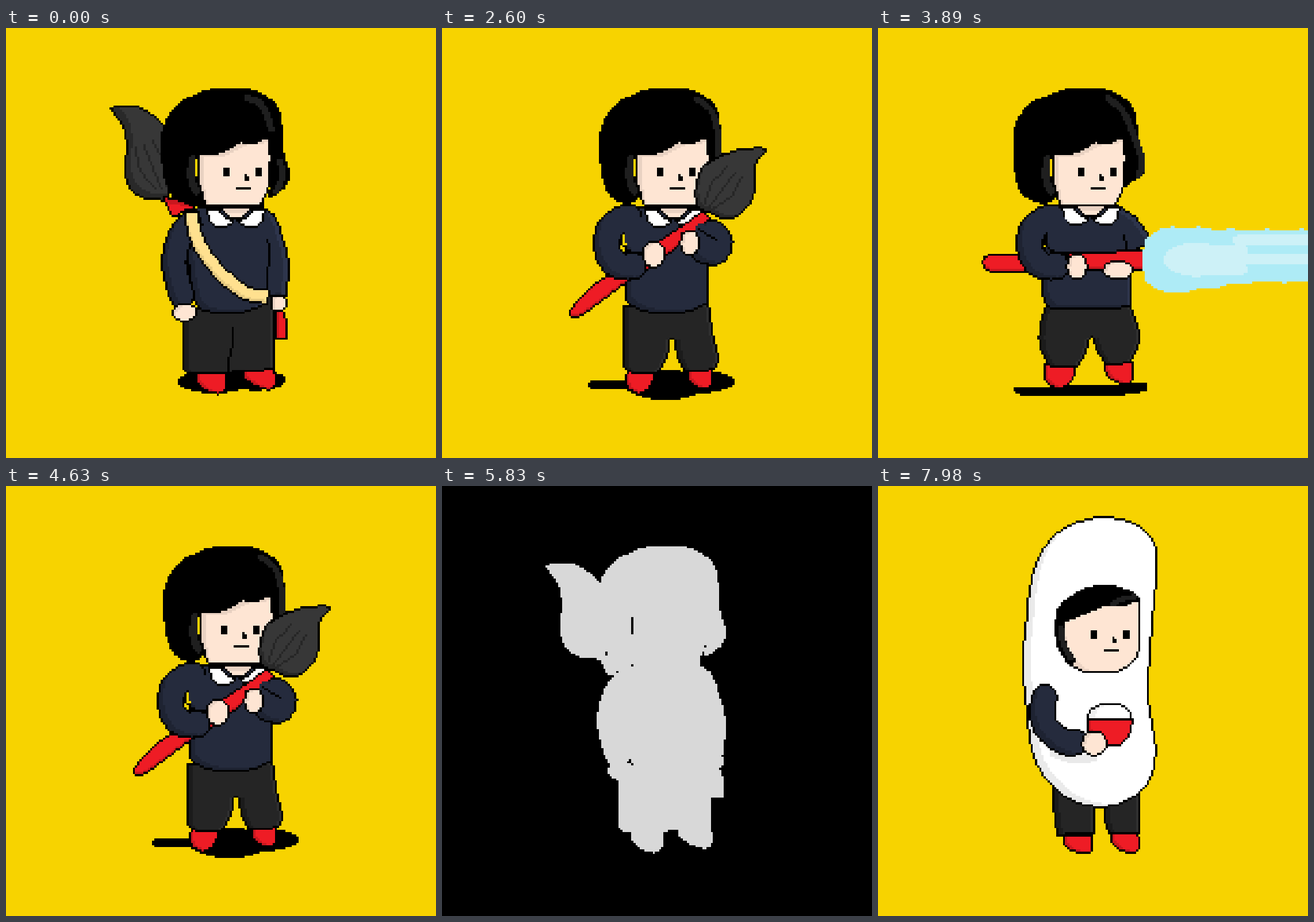
Write an HTML page with a canvas that moves like this. It is 748x748 px and loops after 8 s.

```html
<!DOCTYPE html>
<html lang="en">
<head>
<meta charset="utf-8">
<title>Brush hero</title>
<style>
  html, body { margin: 0; width: 100%; height: 100%; overflow: hidden; background: #f7d300; }
  canvas { display: block; width: 100vw; height: 100vh; image-rendering: pixelated; }
</style>
</head>
<body>
<canvas id="stage" width="748" height="748"></canvas>
<script>
// All drawing happens on a grid of N x N hard pixels.
const N = 200;
const C = {
  bg: '#f7d300', ink: '#000000', skin: '#fee5d3', navy: '#252b3d', pants: '#252525', hair: '#1f1f1f',
  brush: '#373737', bristle: '#262626', red: '#ee1c25', strap: '#ffe08f', white: '#ffffff',
  water: '#aeebf6', foam: '#cdf1f7', ghost: '#d8d8d8'
};

const newCanvas = () => Object.assign(document.createElement('canvas'), { width: N, height: N });
const stage = document.getElementById('stage').getContext('2d');
stage.imageSmoothingEnabled = false;
const pen = newCanvas().getContext('2d', { willReadFrequently: true });
pen.lineCap = pen.lineJoin = 'round';

let px, ox = 0, oy = 0;

function shift(dx, dy, draw) {
  ox += dx; oy += dy;
  draw();
  ox -= dx; oy -= dy;
}

// Packed pixel value, optionally darkened or lightened.
function ink(hex, tone = 1) {
  const [r, g, b] = [1, 3, 5].map(i => Math.min(255, parseInt(hex.substr(i, 2), 16) * tone));
  return (0xff000000 | b << 16 | g << 8 | r) >>> 0;
}

const parse = s => s.split(' ').map(p => {
  const [x, y] = p.split(',').map(parseFloat);
  return { x, y, corner: p.endsWith('!') };
});

// Smooth curve through "x,y" points; a trailing "!" makes a corner.
function spline(s, closed = true) {
  const pts = parse(s), n = pts.length, path = new Path2D();
  const at = i => pts[(i + n) % n];
  const handle = (i, len) => {
    const p = at(i), a = at(i - 1), b = at(i + 1);
    if (p.corner || (!closed && (i === 0 || i === n - 1))) return [0, 0];
    const d = Math.hypot(b.x - a.x, b.y - a.y) || 1;
    return [(b.x - a.x) / d * len / 3, (b.y - a.y) / d * len / 3];
  };
  path.moveTo(pts[0].x, pts[0].y);
  for (let i = 0; i < (closed ? n : n - 1); i++) {
    const a = at(i), b = at(i + 1), len = Math.hypot(b.x - a.x, b.y - a.y);
    const [ax, ay] = handle(i, len), [bx, by] = handle(i + 1, len);
    path.bezierCurveTo(a.x + ax, a.y + ay, b.x - bx, b.y - by, b.x, b.y);
  }
  return path;
}

function mask(path, width) {
  pen.setTransform(1, 0, 0, 1, 0, 0);
  pen.clearRect(0, 0, N, N);
  pen.translate(ox, oy);
  pen.lineWidth = width;
  if (width) pen.stroke(path); else pen.fill(path);
  const d = pen.getImageData(0, 0, N, N).data;
  return Uint8Array.from({ length: N * N }, (_, i) => d[i * 4 + 3] > 127);
}

// Each rim [dx, dy, tone] shades the side of the shape that a shifted copy leaves bare.
function paint(path, color, { rims = [], edge = true, width = 0 } = {}) {
  const m = mask(path, width), base = ink(color), black = ink(C.ink);
  const tones = rims.map(([dx, dy, tone]) => [dy * N + dx, ink(color, tone)]);
  m.forEach((on, i) => {
    if (!on) return;
    px[i] = base;
    for (const [step, c] of tones) if (!m[i - step]) px[i] = c;
    if (edge && !(m[i - 1] && m[i + 1] && m[i - N] && m[i + N])) px[i] = black;
  });
}

const shape = (s, color, ...rims) => paint(spline(s), color, { rims });
const flat = (s, color) => paint(spline(s), color, { edge: false });
const limb = (s, width, color, ...rims) => paint(spline(s, false), color, { rims, width });
const stripe = (s, width, color) => paint(spline(s, false), color, { width, edge: false });

function oval(x, y, rx, ry, color, rims = [], edge = true) {
  const path = new Path2D();
  path.ellipse(x, y, rx, ry, 0, 0, 7);
  paint(path, color, { rims, edge });
}

function box(x, y, w, h, color = C.ink) {
  for (let j = y + oy; j < y + oy + h; j++) for (let i = x + ox; i < x + ox + w; i++) px[j * N + i] = ink(color);
}

function line(s, color = C.ink) {
  parse(s).reduce((a, b) => {
    const n = Math.ceil(Math.max(Math.abs(b.x - a.x), Math.abs(b.y - a.y)));
    for (let k = 0; k <= n; k++) {
      box(Math.floor(a.x + (b.x - a.x) * k / n), Math.floor(a.y + (b.y - a.y) * k / n), 1, 1, color);
    }
    return b;
  });
}

const SKIN = [2, 1, 0.92], RED = [2, -1, 0.85], NAVY = [3, -2, 0.82];
const CLOTH = [[3, 0, 0.74], [-2, 0, 1.3]];

// Parts shared by the poses
function features(dx, dy) {
  shift(dx, dy, () => {
    for (const x of [101, 116]) box(x, 65, 3, 4);
    box(111, 68, 1, 3);
    box(112, 69, 1, 2);
    box(107, 74, 7, 1);
  });
}

function head(dx, look, back, lock, ...shine) {
  shift(dx, 0, () => {
    shape('88.5,58! 98,58! 110,52! 123.4,51! 123.4,68 122,76 118,83.2! 93,83.2! 90,76', C.skin, [3, 2, 0.92]);
    flat(`123,51! 115,54 110.5,54 109.5,52! 105,56 98,58.7 88.7,59! 88.7,70 92,77! 89,81 83,81.5 ${77 - back},78 ${73.5 - back},70 `
      + `${72.3 - back},58 ${73 - back},46 ${79 - back},36 88,31 97,28.1 111,28.1 121,31.5 127,37.5 128.7,47 129.5,58 132,68 130,${74 - lock} 122,${79.7 - lock}! 123.3,66`, C.ink);
    stripe('86.8,61 86,69 88.5,76', 3.4, C.hair);
    shine.forEach(s => stripe(s, 3, C.hair));
  });
  features(look, 0);
}

function collar(dx, dy = 0) {
  const outline = [[13.5, 84], [7.5, 84], [6, 87], [0, 89.5], [3, 92], [9, 92.7], [13, 89]];
  shift(dx, dy, () => {
    shape('99.5,83! 114.5,83! 112,87 107,89.2 102,87', C.skin, [0, 3, 0.92]);
    for (const side of [-1, 1]) {
      shape(outline.map(([x, y], i) => `${107 + side * x},${y}${i % 3 < 2 && i < 4 ? '!' : ''}`).join(' '), C.white);
    }
  });
}

function shoe(x, y, w, h, lean) {
  const mid = y + h * 0.6, low = y + h;
  shape(`${x},${y}! ${x + w},${y}! ${x + w + lean * 0.5},${mid} ${x + w * 0.75 + lean},${low} ${x + w * 0.4 + lean},${low} ${x + lean * 0.4},${mid}`, C.red, RED);
}

function bentArm(dx) {
  shift(dx, 0, () => {
    limb('87,88 78.5,93 76.8,102.5 81,110 89,110.8', 13, C.navy, NAVY);
    stripe('87,89.5 90,94 90,97', 11, C.navy);
    line('83,97 84,101 86,103.5 94,105.5');
  });
}

function bristles(x, y, dx, dy) {
  for (const i of [-1, 0, 1]) {
    const bow = i * 0.28;
    line(`${x - dy * i * 0.12},${y + dx * i * 0.12} ${x + dx * 0.5 - dy * bow},${y + dy * 0.5 + dx * bow} ${x + dx - dy * i * 0.2},${y + dy + dx * i * 0.2}`, C.bristle);
  }
}

// Poses
function walk(k, shadow = true) {
  const sway = -Math.round(Math.sin(k * Math.PI / 3)), bob = k % 3 === 1 ? -1 : 0;
  if (shadow) {
    oval(97, 164.5, 17, 5.3, C.ink, [], false);
    oval(116, 163.7, 14, 5, C.ink, [], false);
  }
  shift(0, k === 1 ? -2 : 0, () => shoe(88, 159, 14.5, 11, 2));
  shift(0, k === 4 ? -2 : 0, () => shoe(109.5, 157, 14.5, 11, 4));
  shift(sway, bob, () => {
    shape('48,37.5! 51,36.3 61,36.3 68,40 75,46! 76,80! 72,80.5 63,79 57,74 55,65 55.8,55 54,46', C.brush, [3, -3, 0.76]);
    bristles(72, 74, -8, -20);
    shape('72.5,78! 88,81! 87.5,85 83.5,85! 78,88.5! 75.5,85', C.red, [1, 3, 0.85]);
    shape('124.5,130! 129,131 131,138 131,144.7! 125,144.7!', C.red, [2, 0, 0.85]);
    shape('82,131! 124.8,124! 124.8,159! 104,160.5 84,161! 82,157', C.pants, ...CLOTH);
    line('105,139 105,148 103.5,155 103,160');
    stripe('85,80 118,82', 5, C.ink);
    shape('87,84! 92,83 120,83.5! 125,87 129,97 131.7,108 131,125! 122,125! 122.5,128! 114,131.5 107,133.3 97,132.7 90,131 87,125 84.5,110 83,90', C.navy, NAVY, [-3, 0, 1.25]);
    line('121,98 122.5,101 122,110 121.5,124');
    limb('85.5,91 81,97 78.3,109 81.8,124.5', 12.2, C.navy, NAVY);
    oval(83.2, 132.3, 6, 4.4, C.skin, [SKIN]);
    paintStrap();
    oval(126.7, 128, 4.2, 4, C.skin, [SKIN]);
    collar(0);
    head(0, 0, 0, 0, '112,32.5 119,36 123.3,47', '127.5,62 128.7,69 125.5,76');
  });
}

function paintStrap() {
  pen.lineCap = 'butt';
  limb('86.3,85 88,96 93.8,107 104,118 112,123.3 122.5,125.2', 7.2, C.strap, [1, -2, 0.9]);
  pen.lineCap = 'round';
}

function hold(swing = 0) {
  stripe('70,166 88,165.5', 4.2, C.ink);
  oval(104, 166, 19, 7, C.ink, [], false);
  oval(119, 164.5, 17, 5.2, C.ink, [], false);
  shoe(86, 159, 13, 11, -2);
  shoe(114, 158, 11.5, 10, 1.5);
  shape('84.3,129! 124,127! 127,145 128.7,152 128.3,158! 122,159.8 112,159.5! 109,152 107,141.5! 105.3,152 103,157 100,160.5! 88,160.5 84.3,158!', C.pants, ...CLOTH);
  shape('88,83! 118,83! 123.5,88! 123.7,128! 116,131.7 107,133.3 97,132.7 89,130 85,126! 85,105!', C.navy, NAVY);
  collar(1);
  shift(swing, 0, () => shape('59.2,131.5 64,126 72,118 77,115! 122,84.5! 125.5,89.5! 100,109.5 82,121.5 70,130.5 64,134.5 60,134.5', C.red, [0, -2, 0.85]));
  bentArm(0);
  limb('125.5,94.5 130,99.5 127,105 121,104', 11.2, C.navy, NAVY);
  flat('116,97! 119,91! 125,92! 129,99! 124,102! 118,104!', C.navy);
  line('119,93 122.5,95.5 127,98.5');
  head(1, -1, 0, 0, '117,33 124,38 127,47 127.3,60');
  shift(swing, 0, () => {
    shape('117.4,77 119,68 123,63 134,57.5 148,55.2 151.8,57! 147,62 145.8,67 146,75 143.5,82 138,87.5 132,89.3 126,87 119,83.3', C.brush, [2, -2, 0.76]);
    bristles(124, 83, 12, -16);
  });
  oval(98.5, 105.3, 5.7, 6.4, C.skin, [SKIN]);
  oval(115.2, 99.7, 4.9, 6.3, C.skin, [SKIN]);
}

function beam(reach, spread, k) {
  const mid = 107.7, end = 124 + 84 * reach, y = v => mid + v * spread;
  const top = [], bottom = [];
  for (let x = 124; x <= end; x += 4) {
    const u = x - 124, round = Math.sqrt(1 - (1 - Math.min(1, (u + 3) / 19)) ** 2);
    const wave = Math.sin(x * 0.4 + k * 2) * 0.4;
    top.push(`${x},${y(wave - round * (16 - Math.min(2.2, u / 20)))}`);
    bottom.unshift(`${x},${y(wave + round * (16 - 5.5 * Math.min(1, Math.max(0, u - 12) / 36)))}`);
  }
  flat([...top, ...bottom].join(' '), C.water);
  const nose = Math.min(15, 40 * reach);
  oval(133 + nose, mid, nose, 8 * spread, C.foam, [], false);
  for (let i = 0; i < 4; i++) {
    const from = i ? 150 : 167, to = Math.min(end - 3, i % 2 ? 170 : 206);
    if (to > from) stripe(`${from},${y(i * 4.5 - 9)} ${to},${y(i * 4.5 - 9)}`, 4.5 * spread, C.foam);
  }
}

function aim(dx, reach = 0, spread = 1, k = 1) {
  flat('63,167! 108,166! 125,165! 125,169! 112,171! 67,171! 63,169!', C.ink);
  shoe(77.5, 156, 14.5, 11.3, -1.5);
  shoe(105.5, 155, 13, 10.5, 1.5);
  shift(dx, 0, () => {
    shape('78,129! 117.5,129! 121.5,140 121.3,148 117.5,156! 107,157.5! 102,151 99,141.5! 97,151 92.5,158! 80,158! 75,149 75,138', C.pants, ...CLOTH);
    shape('80,82! 111,82.3! 119,87 126,96 126.3,100! 117.7,105! 117.7,130! 107,130.8 80,130.5! 77,127 76,118', C.navy, NAVY, [-2, 2, 1.25]);
    line('114,96 115.5,100 115,104');
    collar(-8, -1);
    shape('48.3,109.5 50,106 55,105.2 66,105.2! 95,104.3 124,103! 124,112.7! 66,113.7! 52,113.7', C.red, [0, -2, 0.85]);
    bentArm(-6);
    oval(92.5, 110.9, 5.2, 6.4, C.skin, [SKIN]);
    oval(111.6, 112.7, 7.4, 4.6, C.skin, [SKIN]);
    head(-8, -8, 1.5, 5, '115,32.5 122,39 127,50 131,63 129,69');
    if (reach < 1 || spread < 0.9) {
      shape('124,103! 133,95 144,94.5 154,100 162,104.5! 154,110 144,117 133,119 125.5,115', C.brush, [0, -3, 0.76]);
      bristles(129, 107, 20, -1);
    }
    if (reach) beam(reach, spread, k);
  });
}

function costume(dy) {
  shift(0, dy, () => {
    shoe(86, 162, 13.5, 9, 2);
    shoe(108, 161, 13, 9.7, 2);
    shape('81.3,139! 101,139! 101,162! 83,162.5! 81.5,152!', C.pants, ...CLOTH);
    shape('105,139! 122,139! 122,161.7! 107,162! 105,155!', C.pants, ...CLOTH);
    shape('97.6,15 105,14 115,15.5 124,20 129.5,28 130.5,36 129,53 126.7,80 126.3,100 128,111 129.7,124 126,138 116,146.7 104,149.7 92,147.5 81,140 72,126 68.5,102 67,82 68.5,63 71,43 76,30 86,19.5', C.white, [4, -2, 0.92]);
    stripe('82,124 92,127 100,126', 4.5, '#e9e9e9');
    shape('83,59 87,53 97,47.3 108,46 118,49 122,53! 122,75 119,82 111,86.8 96,86.8 88,82 83,73', C.skin, [5, 0, 0.93]);
    flat('83,59 87,53 97,47.3 108,46 118,49 122,53! 114,56.5! 107,55.5! 98,59 87,63.5! 87,71 92,81! 90,84 84,76 83,70', C.ink);
    stripe('109,54.8 114,52.5 119.5,51.5', 2.6, C.hair);
    stripe('85.3,66 86,73 89.5,80', 2.6, C.hair);
    features(-2, 2);
    limb('77.5,98.3 76.4,107 80,114.5 87,119 92,119.3', 12.4, C.navy, NAVY);
    oval(107.8, 109, 11, 8.6, C.white, [[4, 0, 0.94]]);
    shape('96.8,108! 118.8,108! 118,114 114,120 111,121! 105.5,121! 100,117.5 97.2,113', C.red, RED);
    oval(100.6, 119.6, 6.3, 6.2, C.skin, [SKIN]);
  });
}

function ghost(suited) {
  if (suited) costume(-1); else walk(0, false);
  const light = ink(C.ghost), black = ink(C.ink);
  px.forEach((v, i) => { px[i] = v ? light : black; });
}

// Timeline: each step holds one pose.
const steps = [];
let total = 0;
function add(ms, pose, ...args) {
  steps.push({ at: total, pose, args });
  total += ms;
}
for (let k = 0; k < 12; k++) add(200, walk, k % 6);
add(200, hold, -11);
add(200, hold);
for (const dx of [2, 1]) add(200, aim, dx);
for (const reach of [0.3, 0.6]) add(100, aim, 1, reach, 0.5 + reach / 2);
for (let k = 0; k < 9; k++) add(70, aim, k < 4 ? 1 : k % 2 * 2 - 2, 1, k % 2 ? 1 : 0.94, k);
for (let k = 3; k >= 0; k--) add(100, aim, 0, k && 1, k / 4);
add(200, aim, 1);
add(200, hold);
add(200, hold, -11);
for (let k = 2; k < 6; k++) add(200, walk, k);
for (let k = 0; k < 13; k++) add(k < 4 ? 200 : k < 10 ? 100 : 50, ghost, k % 2);
for (let k = 0; k < 4; k++) add(k < 3 ? 200 : 20, costume, k % 2 - 1);

const cache = new Map();
function picture({ pose, args }) {
  const key = pose.name + args;
  if (!cache.has(key)) {
    px = new Uint32Array(N * N);
    pose(...args);
    const bg = ink(C.bg), c = newCanvas();
    px.forEach((v, i) => { if (!v) px[i] = bg; });
    c.getContext('2d').putImageData(new ImageData(new Uint8ClampedArray(px.buffer), N, N), 0, 0);
    cache.set(key, c);
  }
  return cache.get(key);
}
steps.forEach(picture);

const show = t => stage.drawImage(picture(steps.findLast(s => s.at <= t)), 0, 0, 748, 748);
let start;
function frame(now) {
  start ??= now;
  show((now - start) % total);
  requestAnimationFrame(frame);
}
show(0);
requestAnimationFrame(frame);
</script>
</body>
</html>
```
